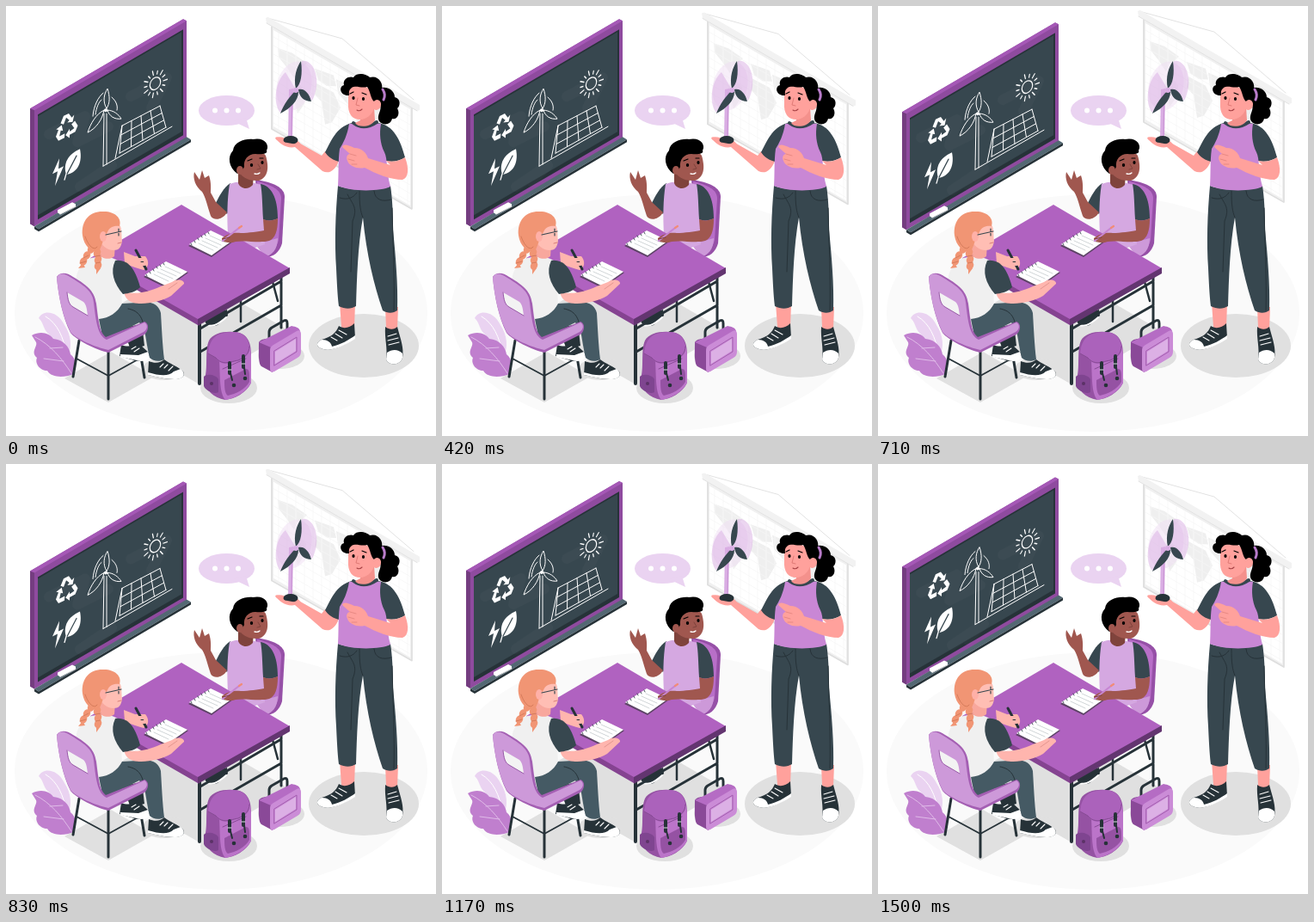
Recreate the animation shown at these times as an HTML page with a canvas. Size 500x500 px, loop 1540 ms.

```html
<!DOCTYPE html>
<html lang="en">
<head>
<meta charset="utf-8">
<title>Renewable energy lesson</title>
<style>
html, body { margin: 0; width: 100%; height: 100%; overflow: hidden; background: #fff; }
canvas { display: block; width: 500px; height: 500px; }
</style>
</head>
<body>
<canvas id="stage" width="500" height="500"></canvas>
<script>
const ctx = document.getElementById('stage').getContext('2d');
const LOOP = 1540;
const DARK = '#37474f', INK = '#263238', WHITE = '#fff', BLACK = '#000';
const PURPLE = '#b062c0', LILAC = '#c987d5', PALE = '#d5a8e1', SHADOW = '#e0e0e0';
const PINK = '#ffa19c', ROSE = '#ffb5ae', BROWN = '#a0574f', ORANGE = '#f19574';

ctx.lineCap = ctx.lineJoin = 'round';

function fill(color, d) {
  ctx.fillStyle = color;
  ctx.fill(new Path2D(d));
}

function line(color, width, d) {
  ctx.strokeStyle = color;
  ctx.lineWidth = width;
  ctx.stroke(new Path2D(d));
}

function oval(color, x, y, rx, ry = rx, tilt = 0) {
  ctx.fillStyle = color;
  ctx.beginPath();
  ctx.ellipse(x, y, rx, ry, tilt, 0, 2 * Math.PI);
  ctx.fill();
}

function shifted(dy, draw) {
  ctx.save();
  ctx.translate(0, dy);
  draw();
  ctx.restore();
}

const wave = (t, peak) => Math.cos(2 * Math.PI * (t - peak) / LOOP);

function floor() {
  oval('#fafafa', 250, 357, 240, 138);
  oval(SHADOW, 416, 395, 64, 37);
  fill(SHADOW, 'M204 305L330 378L225 440L98 367Z');
  fill(SHADOW, 'M68 433L122 402L172 431L119 461Z');
  oval(SHADOW, 184, 422, 25, 13);
  oval(SHADOW, 259, 444, 33, 18);
  oval(SHADOW, 320, 407, 27, 15);
}

function screen() {
  line('#e2e2e2', 1, 'M304 14L391 38L474 109');
  fill('#f0f0f0', 'M308 23L472 118V237L308 143Z');
  fill(WHITE, 'M311 28L470 120V232L311 140Z');
  ctx.save();
  ctx.clip(new Path2D('M311 28L470 120V232L311 140Z'));
  // iso-skewed world map
  ctx.transform(1, 0.58, 0, 1, 311, 28);
  fill('#efefef', 'M5 18L22 14L39 16L33 25L27 31L24 42L15 34L6 28Z M26 44L38 50L36 65L28 81L22 60Z M48 17L70 12L73 23L62 29L52 28Z M50 33L70 32L78 45L68 68L60 75L56 51L48 47Z M73 15L108 10L137 20L129 35L116 49L108 42L98 51L88 37L75 30Z M118 62L137 60L140 75L124 77Z');
  ctx.lineWidth = 0.8;
  ctx.strokeStyle = '#f6f6f6';
  ctx.beginPath();
  for (let x = 6; x < 160; x += 10) { ctx.moveTo(x, 0); ctx.lineTo(x, 112); }
  for (let y = 8; y < 112; y += 10) { ctx.moveTo(0, y); ctx.lineTo(160, y); }
  ctx.stroke();
  ctx.restore();
  line('#dedede', 1.6, 'M309 24V143L472 236V118');
  fill('#f2f2f2', 'M302 14L305 13L481 115V121L478 122L303 20Z');
  line('#e2e2e2', 1, 'M303 20L478 122');
}

function recycle() {
  ctx.save();
  ctx.transform(1, -0.48, 0, 1.15, 70.5, 141);
  for (let i = 0; i < 3; i++) {
    ctx.rotate(2 * Math.PI / 3);
    fill(WHITE, 'M-7 -7L-3.5 -13H2.5L6 -7.5L8.8 -9L7 -2.6L0.8 -4.5L3.2 -6L-0.5 -10L-3.5 -4.5Z');
  }
  ctx.restore();
}

function sun() {
  ctx.save();
  ctx.transform(1, -0.35, 0, 1.12, 173.5, 90);
  ctx.strokeStyle = WHITE;
  ctx.lineWidth = 1.2;
  ctx.beginPath();
  ctx.arc(0, 0, 6.2, 0, 2 * Math.PI);
  for (let i = 0; i < 14; i++) {
    const a = i * Math.PI / 7, far = i % 2 ? 12.5 : 14;
    ctx.moveTo(9.5 * Math.cos(a), 9.5 * Math.sin(a));
    ctx.lineTo(far * Math.cos(a), far * Math.sin(a));
  }
  ctx.stroke();
  ctx.restore();
}

function solarPanel() {
  const mix = (a, b, k) => a + (b - a) * k;
  const at = (u, v) => [mix(mix(135, 179, u), mix(132, 186, u), v),
                        mix(mix(139, 116, u), mix(171, 141, u), v)];
  ctx.strokeStyle = WHITE;
  ctx.lineWidth = 1;
  ctx.beginPath();
  for (let i = 0; i <= 4; i++) {
    ctx.moveTo(...at(i / 4, 0));
    ctx.lineTo(...at(i / 4, 1));
  }
  for (let i = 0; i <= 3; i++) {
    ctx.moveTo(...at(0, i / 3));
    ctx.lineTo(...at(1, i / 3));
  }
  ctx.stroke();
  line(WHITE, 1, 'M113 186L193 140M135 139L127 177');
}

function board() {
  fill('#8f4b9f', 'M28 119L206 15L210 17V154L33 256L28 253Z');
  fill('#a558b6', 'M28 119L206 15L210 17L33 121Z');
  fill('#743d80', 'M28 119L33 121V256L28 253Z');
  fill(INK, 'M37 126L206 27V150L37 248Z');
  fill(DARK, 'M37 128L204 30V146L37 243Z');
  line('rgba(255,255,255,.025)', 12, 'M50 149L92 128L83 158L119 140M145 105L187 83L169 118M86 210L123 185L104 204');
  recycle();
  fill(WHITE, 'M62 177L54 195L60 192L57 209L67 186L61 189Z');
  fill(WHITE, 'M86 166C72 172 66 183 70 196C84 193 89 181 86 166Z');
  line(DARK, 1.2, 'M82 174L70 197');
  line(WHITE, 1.3, 'M70 195L68 202');
  line(WHITE, 1, 'M114 125L113 186M117 125L117 184M117 119C112 111 114 102 118 96C121 105 121 113 117 119ZM114 121C105 125 98 137 95 147C105 142 112 132 114 121ZM118 121C125 121 131 126 134 131C126 132 120 128 118 121ZM101 128C102 116 107 106 113 101M104 126C105 118 108 111 111 109M123 106C129 111 130 117 129 121');
  oval(WHITE, 116, 121, 2);
  solarPanel();
  sun();
  fill('#536873', 'M33 256L210 152L215 155L38 259Z');
  fill(INK, 'M33 256L38 259L215 155V158L38 262L33 259Z');
  fill(WHITE, 'M60 237L77 228L81 230V233L63 242L60 240Z');
  line('#d8d8d8', 1, 'M63 242L81 233');
}

function bubble() {
  const tint = '#ead3f1';
  oval(tint, 256.5, 121.5, 32.5, 17.5);
  fill(tint, 'M264 134L283 143L279 130Z');
  for (const x of [243, 256.5, 270]) oval(WHITE, x, 121.5, 3);
}

function plant() {
  fill('#ead3f1', 'M38 363C43 352 61 355 68 371C76 383 77 397 72 406C58 400 56 386 48 380C43 374 43 367 38 363Z');
  line(WHITE, 1, 'M46 361C60 369 67 386 70 403');
  fill('#c07fce', 'M30 383C41 377 51 381 55 387C67 388 74 397 75 405C82 410 83 422 78 428C69 432 53 433 48 424C40 424 33 416 36 409C28 402 37 396 35 391Z');
  line('#e0bce8', 1, 'M34 385C52 394 65 410 76 427M51 398L66 397M44 410L67 413');
}

function boy() {
  line(INK, 2.5, 'M309 317L316 343M273 330V367');
  fill('#9650a7', 'M290 202C311 205 324 211 324 222L321 276C318 287 310 293 298 292Z');
  fill('#b86fc8', 'M292 204C308 208 320 213 320 224L317 272C314 283 307 289 298 289Z');
  fill('#cd99d9', 'M290 277L316 270C316 283 309 290 301 292Z');
  fill(DARK, 'M261 206C253 211 248 221 244 229L257 242L263 231Z');
  fill(BROWN, 'M244 228L257 240C252 249 241 250 238 244C234 232 232 222 228 216C220 210 217 200 219 193L225 202L228 191L231 200L236 197C239 206 238 213 238 217Z');
  fill(PALE, 'M260 207C269 203 285 204 297 208C302 222 299 248 301 277L287 282L258 265C257 246 257 225 260 207Z');
  fill(DARK, 'M296 207C308 209 316 222 316 247C310 250 303 250 299 248C298 232 298 217 296 207Z');
  fill('#7f433c', 'M270 190L288 197L287 208C281 215 272 212 270 206Z');
  fill(BROWN, 'M271 174C278 165 298 167 302 174C306 188 305 199 294 203C281 204 273 198 270 191Z');
  fill(BLACK, 'M269 195C259 188 257 175 264 168C265 158 278 154 287 155C300 152 307 161 303 168C305 172 297 173 290 172C281 172 276 179 277 187L274 193Z');
  oval(BROWN, 272, 191, 4, 5);
  oval(BLACK, 285.5, 185, 1.7, 2.1);
  oval(BLACK, 298, 182, 1.6, 2.1);
  line(BLACK, 1.2, 'M281 180L286 178M295 177L299 177');
  line('#7f433c', 1, 'M293 184L296 189L292 190');
  line(WHITE, 1.3, 'M289 195Q293 196 295 194');
}

function writingArm() {
  fill(BROWN, 'M299 248C304 250 310 250 316 247C316 262 313 270 306 273C295 276 278 272 267 274C259 277 250 274 251 270C258 264 267 263 273 264C282 264 294 262 300 261Z');
  line('#c785d2', 2.2, 'M252 273L271 258');
  line('#f18c78', 2.2, 'M271 258L274 256');
  line('#7f433c', 1, 'M252 271L260 269');
}

function notebook(x, y) {
  ctx.save();
  ctx.translate(x, y);
  fill('#5d4366', 'M0 18L26 1L52 13L27 31Z');
  fill(WHITE, 'M1 16L26 0L51 12L27 29Z');
  line('#bcc3c6', 0.7, 'M12 15L29 23M16 12L34 20M20 9L38 17M25 6L43 14');
  line(DARK, 0.9, 'M3 15L4 17M7 12L8 14M11 9L12 11M15 6L16 8M19 4L20 6M23 2L24 4');
  ctx.restore();
}

function table() {
  fill(INK, 'M231 365L243 357L257 353L258 360L246 371C239 374 232 372 231 365Z');
  line(WHITE, 2, 'M232 370C239 374 246 371 256 362');
  line(INK, 3, 'M320 313V374M226 402L320 348M226 375L320 320');
  line(INK, 4, 'M225 369V439');
  fill(PURPLE, 'M204 231L330 305L223 366L98 293Z');
  fill('#854391', 'M98 293L223 364V371L98 299Z');
  fill('#633570', 'M330 304V311L223 372V364Z');
}

function shoe(body, toe, laces) {
  fill(INK, body);
  fill(WHITE, toe);
  line(WHITE, 1.1, laces);
}

function girl() {
  line(INK, 3, 'M85 389L78 431M119 400V457M153 384L161 432');
  line(INK, 1.8, 'M82 410L119 430L157 409');
  fill(INK, 'M136 374L158 370L161 395L145 400Z');
  shoe('M134 394C141 397 149 395 155 393L167 404C167 411 157 414 149 412L132 407Z',
       'M154 406L165 402C169 408 165 413 157 413L133 408V405Z', 'M146 399L151 396M149 402L155 398');
  fill(ROSE, 'M137 286L150 291L162 291C167 297 166 304 160 307C153 305 146 303 138 299Z');
  fill('#f0f0f0', 'M99 293C85 299 79 314 82 329L105 354L108 366C118 367 129 361 135 352L133 298C125 291 110 290 99 293Z');
  fill('#455a64', 'M108 364C120 363 130 356 135 346L153 345C170 342 178 348 180 357C181 374 182 395 184 411C178 414 171 413 167 409C164 397 163 387 161 377L155 368L113 389Z');
  line(INK, 1, 'M142 352C152 354 159 359 161 377');
  fill('#a45fb3', 'M59 315C63 309 71 310 78 315C97 326 103 333 105 346C108 370 109 379 116 385L161 367C167 369 166 378 161 382L119 403C105 400 81 388 75 380C66 362 61 338 59 315Z');
  fill('#cd99d9', 'M59 316C61 309 69 311 76 316C94 327 101 333 102 345C105 370 107 383 117 388L161 368C165 370 165 376 160 379L119 400C105 397 81 387 75 379C66 361 61 338 59 316Z');
  fill('#f3f3f3', 'M71 333L90 344C94 348 94 353 95 360L78 350C73 347 72 340 71 333Z');
  line('#985aa7', 1, 'M71 333C72 342 73 347 78 350L95 360');
  fill(ROSE, 'M137 332C150 336 165 333 180 326L193 321C199 316 208 319 207 323L192 337C180 344 160 348 148 345C141 343 138 338 137 332Z');
  line('#e0938c', 0.9, 'M189 329L199 322');
  fill(DARK, 'M127 296C144 294 151 309 156 327C150 333 143 334 136 335C125 322 121 309 127 296Z');
  shoe('M166 413C173 416 180 415 184 411C190 416 200 419 206 425C209 431 204 434 194 434C185 434 176 431 165 429Z',
       'M195 425L203 422C210 428 207 434 196 434C185 434 175 431 165 429V426C179 430 189 431 195 425Z', 'M184 421L188 417M189 424L194 419M179 420L183 416');
  line(INK, 3, 'M151 284L163 306');
  line(ROSE, 4, 'M151 295L160 295M153 300L161 300');
  fill('#f8a79d', 'M108 274L127 278L126 291C120 296 111 294 107 288Z');
  fill('#ffbeb4', 'M111 261C117 252 130 252 133 256C135 262 134 268 135 273C134 281 131 284 125 284C117 284 111 278 109 272Z');
  fill(ORANGE, 'M89 267C87 248 99 238 114 239C127 239 135 247 132 256C126 255 120 257 118 263C113 269 112 279 107 287C98 285 91 279 89 267Z');
  oval('#ffb0a7', 113, 268, 4, 6);
  for (const [x, y] of [[99, 283], [94, 290], [90, 297], [106, 287], [107, 295], [107, 302]]) oval(ORANGE, x, y, 4, 5, 0.5);
  fill(ORANGE, 'M89 299L84 305L92 304ZM105 304L105 312L110 305Z');
  line('#ce7555', 0.8, 'M92 268C96 280 103 285 106 280M90 293L96 290M86 299L93 297M104 291L110 290M104 299L110 298');
  line(DARK, 1.2, 'M116 266L134 262M131 259V267');
  line('#d47873', 0.9, 'M130 276L134 275');
}

function bags() {
  line(INK, 3, 'M306 390V379Q306 376 309 374L323 366Q327 364 327 369V377');
  fill('#8a4998', 'M294 391C295 388 305 384 309 390L310 426L297 419C293 416 294 401 294 391Z');
  fill('#b56cc4', 'M294 391L332 372C337 373 341 374 342 378L308 397Z');
  fill('#cb8cd7', 'M307 401C307 397 308 396 311 394L338 378C342 376 343 379 343 382V402C343 405 342 407 339 409L312 425C308 427 307 425 307 421Z');
  line('#a35daf', 1, 'M312 401L338 385V402L312 418Z');
  fill('#dcb0e5', 'M313 402L337 387V401L313 416Z');

  fill('#9552a3', 'M231 433C235 422 231 400 236 389C240 381 253 378 264 379C280 379 285 390 285 405V438C280 450 265 457 255 458C241 455 232 448 231 433Z');
  fill('#bb74c9', 'M248 411C247 399 252 389 268 386C280 385 285 395 285 407V438C280 449 264 457 255 458C248 450 249 430 248 411Z');
  fill('#ab62bb', 'M235 404C237 386 244 380 263 379C276 379 282 386 283 396C284 407 275 412 265 414C256 418 248 416 244 409Z');
  line('#874b95', 1, 'M235 404L244 409C252 419 262 413 270 412C278 408 283 404 283 396M252 422L279 410');
  fill('#9552a3', 'M254 435L279 422C283 422 283 427 283 432V437C278 446 267 451 258 453C254 451 254 442 254 435Z');
  fill('#7f4590', 'M230 431C234 427 244 429 247 434V449C242 452 232 447 230 442Z');
  line(INK, 4, 'M260 415V427M276 407V420');
  line(INK, 2, 'M261 427L263 435M277 420L278 428');
  line('#d9dfe1', 1.1, 'M258 423H262M274 416H278');
  oval(INK, 265, 441, 2.3);
  oval(INK, 278, 433, 2.3);
  oval('#5b3266', 239, 439, 2);
}

function turbineModel() {
  ctx.globalAlpha = 0.5;
  oval('#efdef4', 335, 93, 20, 29, 0.25);
  fill('#d9ade3', 'M337 97L344 64C358 61 368 87 356 110ZM337 97L319 124C310 113 313 87 325 77Z');
  ctx.globalAlpha = 1;
  fill('#d9ade3', 'M329 97L334 96L333 155H328Z');
  line('#c48bd0', 0.8, 'M333 101L332 154');
  oval(INK, 331, 156, 8.5, 5);
  fill(DARK, 'M337 96C334 83 338 71 343 64C345 79 343 91 337 96ZM337 98C330 105 323 114 319 125C331 119 340 110 340 100ZM340 97C347 95 353 102 355 111C347 111 341 106 340 97Z');
  oval('#d9ade3', 337, 98, 3);
}

function teacher() {
  fill(PINK, 'M388 345L406 346L405 374C400 378 393 377 390 373ZM441 350L456 350L455 375C450 379 444 378 442 374Z');
  fill(DARK, 'M386 209C383 242 382 275 384 305C385 328 386 343 387 349C395 353 402 352 407 349C408 318 409 278 415 246C419 288 428 325 438 354C444 358 451 357 455 354C456 324 453 291 450 260C450 239 449 222 447 209C430 214 400 215 386 209Z');
  line(INK, 1, 'M411 215C411 232 412 238 415 246M388 223C397 226 404 223 408 217M397 219C404 232 409 235 403 250L401 309M428 215C429 226 438 228 448 225M449 235C450 280 452 315 451 354');
  shoe('M387 372C393 376 400 374 405 369L406 386C395 393 381 402 369 399C360 397 360 391 367 388C378 385 384 380 387 372Z',
       'M367 388C374 388 378 391 379 396C389 394 399 388 406 383V387C395 394 380 402 369 399C360 397 360 391 367 388Z', 'M378 385L385 389M383 381L391 386M387 377L396 382');
  shoe('M441 373C446 377 452 376 455 373C459 388 463 398 461 409C459 418 445 419 442 411C444 397 440 387 441 373Z',
       'M443 403C449 399 456 399 461 404V409C459 418 445 419 442 411Z', 'M444 384L454 381M444 389L456 386M445 394L457 391');
  // raised arm with the model
  fill(PINK, 'M371 169L387 180C383 191 376 196 368 192L336 164C327 166 317 160 313 153C319 151 325 154 331 156C336 152 340 158 344 161L367 174Z');
  turbineModel();
  line(PINK, 3, 'M315 154L324 160L335 162');
  // shirt under the vest
  fill(DARK, 'M402 136C383 141 378 158 371 170C374 175 381 180 388 181V200H440L442 180C449 182 458 180 464 176C459 157 451 138 432 136Z');
  fill(LILAC, 'M399 137C397 150 392 160 388 166C386 180 387 196 386 209C400 216 435 216 447 210C442 192 444 178 440 170C435 160 434 148 436 137L425 136Z');
  line(DARK, 4, 'M404 136Q416 145 431 135');
  fill(BLACK, 'M433 96C444 92 452 99 452 106C460 108 458 117 455 119C459 126 454 133 449 131C447 139 438 139 434 134C430 126 439 121 434 113Z');
  fill('#f4918c', 'M412 122L428 117L429 133C424 141 410 142 406 136L412 133Z');
  fill(PINK, 'M398 96C407 88 424 92 429 105C430 119 426 129 414 132C403 133 397 126 398 112Z');
  fill(BLACK, 'M399 104C389 105 386 94 393 92C391 84 400 81 404 83C409 76 420 80 423 83C433 80 439 90 437 97C440 105 438 113 432 119L428 111C424 108 424 100 420 94C413 96 407 92 402 95C398 98 399 101 399 104Z');
  oval(PINK, 431, 115, 5, 6, 0.3);
  line('#b97cca', 3, 'M438 97Q442 103 439 109');
  oval(BLACK, 404, 107, 1.6, 2.1);
  oval(BLACK, 415.5, 108, 1.6, 2.1);
  line(BLACK, 1.2, 'M400 102L404 100M414 101L419 103');
  line('#e07a76', 1, 'M409 107L407 115L411 116');
  line('#a84346', 1.1, 'M408 121Q411 123 414 120');
  fill(PINK, 'M442 180C450 182 458 180 464 176C469 189 468 200 461 202C447 202 430 195 417 188C408 190 399 186 397 180C395 176 397 172 400 172L391 164C392 160 397 161 405 165C414 165 419 171 421 177L447 185Z');
  line('#e58681', 0.9, 'M400 172L407 174M398 178L405 180M402 184L408 184');
}

function draw(t) {
  ctx.clearRect(0, 0, 500, 500);
  floor();
  shifted(-3.9 - 4 * wave(t, 700), screen);
  shifted(2.5 - 3.6 * wave(t, 210), board);
  bubble();
  plant();
  boy();
  table();
  notebook(160, 297);
  notebook(212, 261);
  writingArm();
  girl();
  bags();
  teacher();
}

function tick() {
  draw(performance.now() % LOOP);
  requestAnimationFrame(tick);
}
tick();
</script>
</body>
</html>
```
